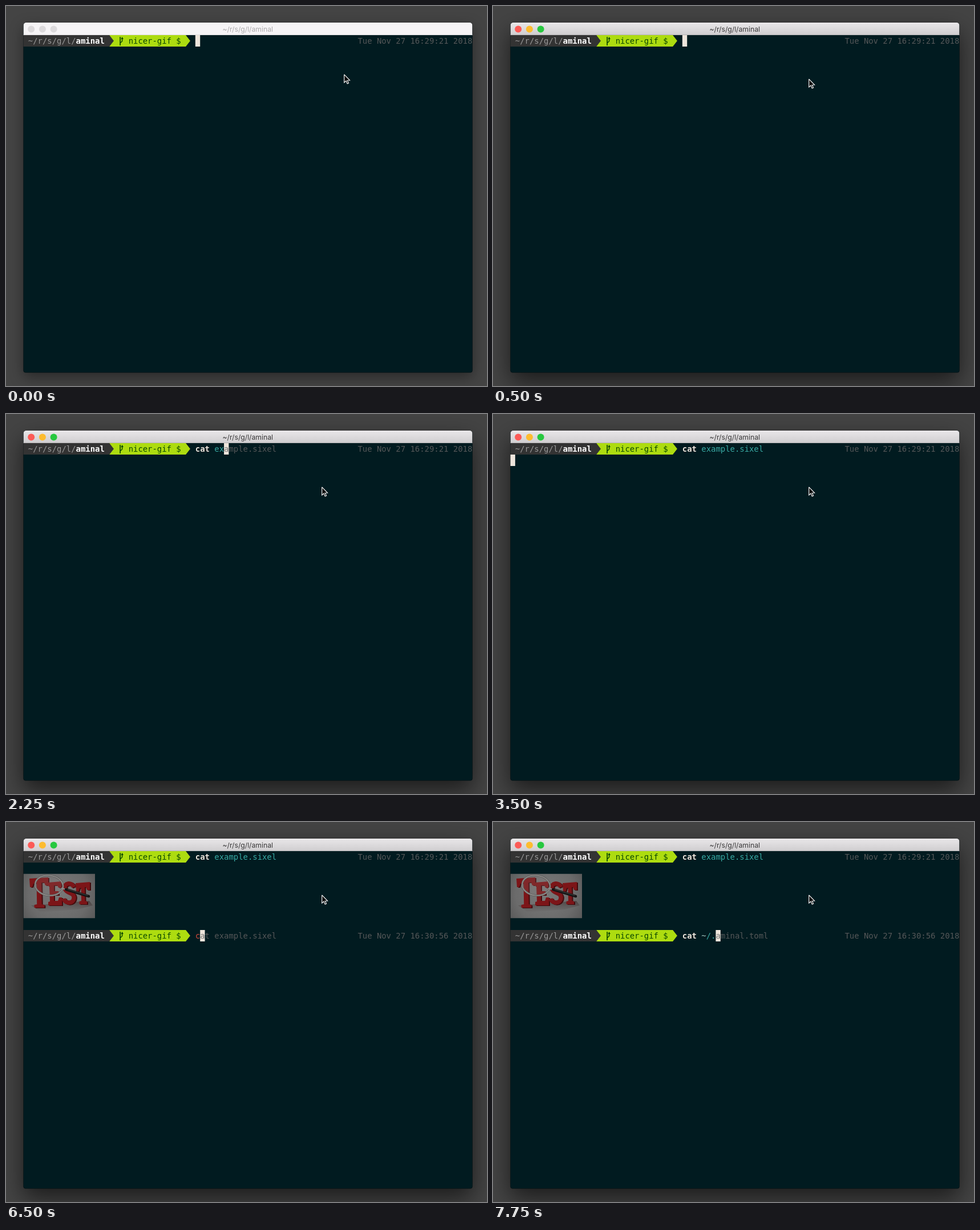
Recreate the animation shown at these times as an HTML page with a canvas. Size 843 by 665 pixels, loop 8 s.

```html
<!DOCTYPE html>
<html lang="en">
<head>
<meta charset="utf-8">
<title>Terminal</title>
<style>
html, body { margin: 0; width: 100%; height: 100%; overflow: hidden; background: #444; }
canvas { display: block; }
</style>
</head>
<body>
<canvas id="stage" width="843" height="665"></canvas>
<script>
const ctx = document.getElementById('stage').getContext('2d');
const LOOP = 8000;
const CELL = 8.37, LINE = 19.67;
const WIN = { x: 30.5, y: 29, w: 787, h: 612.5, bar: 22 };
const INPUT_COL = 36;
const MONO = '13.9px "DejaVu Sans Mono", monospace';
const PALE = '#eee5dc', CYAN = '#38aaa4', DIM = '#555758', GREEN = '#addc10', INK = '#0c4801';
const SIXEL = 'cat example.sixel', TOML = 'cat ~/.aminal.toml';

// Each step holds until the next: start time, typed text, suggested command.
const firstInput = [
  [0, '', ''],
  [1500, 'c', TOML],
  [1750, 'cat ', TOML],
  [2250, 'cat ex', SIXEL],
  [2750, SIXEL + ' ', '']
];
const secondInput = [
  [4000, '', ''],
  [6500, 'c', SIXEL],
  [6750, 'cat', SIXEL],
  [7000, 'cat ', SIXEL],
  [7250, 'cat ~', TOML],
  [7500, 'cat ~/', TOML],
  [7750, 'cat ~/.', TOML]
];

const stepAt = (steps, t) => steps.filter(s => s[0] <= t).pop();
const colX = col => WIN.x + col * CELL;
const rowY = row => 51 + row * LINE;

function polygon(points, fill) {
  ctx.beginPath();
  points.forEach(([x, y]) => ctx.lineTo(x, y));
  ctx.closePath();
  ctx.fillStyle = fill;
  ctx.fill();
}

function line(points, color, width) {
  ctx.beginPath();
  points.forEach(([x, y]) => ctx.lineTo(x, y));
  ctx.strokeStyle = color;
  ctx.lineWidth = width;
  ctx.stroke();
}

function disc(x, y, r, fill) {
  ctx.beginPath();
  ctx.arc(x, y, r, 0, Math.PI * 2);
  ctx.fillStyle = fill;
  ctx.fill();
}

// Text sits on the terminal grid, one glyph per cell.
function write(text, col, row, color, bold) {
  ctx.font = (bold ? 'bold ' : '') + MONO;
  ctx.textAlign = 'left';
  ctx.fillStyle = color;
  const y = Math.round(rowY(row) + 15);
  [...text].forEach((ch, i) => ctx.fillText(ch, colX(col + i), y));
}

function cells(col, count, row, color) {
  const y = Math.round(rowY(row));
  ctx.fillStyle = color;
  ctx.fillRect(colX(col), y, count * CELL, 20);
}

function arrow(col, row, color) {
  const x = colX(col), y = Math.round(rowY(row));
  polygon([[x - 0.5, y], [x, y], [x + 7.8, y + 10], [x, y + 20], [x - 0.5, y + 20]], color);
}

function branchIcon(col, row) {
  const x = colX(col), y = Math.round(rowY(row));
  line([[x + 2.2, y + 3], [x + 2.2, y + 18]], INK, 1.7);
  line([[x + 2.2, y + 14], [x + 5.7, y + 10.5], [x + 5.7, y + 5]], INK, 1.5);
  polygon([[x + 3.4, y + 7], [x + 5.7, y + 3], [x + 8, y + 7]], INK);
}

function prompt(row, date) {
  cells(0, 18, row, '#333');
  cells(18, 16, row, GREEN);
  arrow(18, row, '#333');
  arrow(34, row, GREEN);
  write('~/r/s/g/l/', 1, row, '#999');
  write('aminal', 11, row, '#fff', true);
  branchIcon(20, row);
  write('nicer-gif $', 22, row, INK);
  write(date, 70, row, DIM);
}

function commandLine(row, [, typed, suggestion], showCursor) {
  const end = INPUT_COL + typed.length;
  if (typed.startsWith('cat')) {
    write('cat', INPUT_COL, row, PALE, true);
    [...typed.slice(3)].forEach((ch, i) =>
      write(ch, INPUT_COL + 3 + i, row, ch === '~' ? '#a9cbc5' : CYAN));
  } else {
    write(typed, INPUT_COL, row, '#d04a3c');
  }
  const rest = suggestion.slice(typed.length);
  write(rest, end, row, DIM);
  if (showCursor) {
    cells(end, 1, row, PALE);
    write(rest.slice(0, 1), end, row, '#777');
  }
}

function windowShape() {
  ctx.beginPath();
  ctx.roundRect(WIN.x, WIN.y, WIN.w, WIN.h, [5, 5, 4, 4]);
}

function windowFrame(focused) {
  ctx.save();
  ctx.shadowColor = focused ? 'rgba(0,0,0,.6)' : 'rgba(0,0,0,.4)';
  ctx.shadowBlur = focused ? 42 : 24;
  ctx.shadowOffsetY = focused ? 16 : 8;
  windowShape();
  ctx.fillStyle = '#011b20';
  ctx.fill();
  ctx.restore();
  ctx.strokeStyle = 'rgba(0,0,0,.3)';
  ctx.lineWidth = 1;
  ctx.stroke();

  ctx.save();
  windowShape();
  ctx.clip();
  const bar = ctx.createLinearGradient(0, WIN.y, 0, WIN.y + WIN.bar);
  bar.addColorStop(0, focused ? '#e9e7e9' : '#f6f4f6');
  bar.addColorStop(1, focused ? '#cfcdcf' : '#f6f4f6');
  ctx.fillStyle = bar;
  ctx.fillRect(WIN.x, WIN.y, WIN.w, WIN.bar);
  ctx.fillStyle = focused ? '#b5b3b5' : '#dddbdd';
  ctx.fillRect(WIN.x, WIN.y + WIN.bar - 1, WIN.w, 1);
  ctx.restore();

  const lights = focused ? ['#fc5b57', '#fdbc2f', '#27c83f'] : Array(3).fill('#dcdadc');
  lights.forEach((color, i) => disc(44.2 + i * 19.7, 40.5, 6, color));
  ctx.font = '12.2px Inter, sans-serif';
  ctx.textAlign = 'center';
  ctx.fillStyle = focused ? '#3a393a' : '#adabad';
  ctx.fillText('~/r/s/g/l/aminal', 423.7, 45);
}

function letters(color) {
  const tee = (x, y, w, h) => polygon([
    [x, y + 2], [x + w, y], [x + w, y + 14], [x + w - 5, y + 14], [x + w - 7, y + 9],
    [x + w * 0.64, y + 9], [x + w * 0.66, y + h - 6], [x + w * 0.8, y + h - 5],
    [x + w * 0.8, y + h], [x + w * 0.26, y + h], [x + w * 0.26, y + h - 5],
    [x + w * 0.4, y + h - 6], [x + w * 0.38, y + 10], [x + 7, y + 11],
    [x + 5, y + 17], [x + 1, y + 17]
  ], color);
  tee(41, 97, 33, 53);
  tee(122, 105, 25, 39);
  polygon([
    [73, 106], [97, 104], [97, 115], [92, 115], [90, 111], [84, 111], [84, 121], [92, 121],
    [92, 128], [84, 128], [84, 138], [91, 138], [93, 132], [98, 132], [98, 146], [74, 146],
    [74, 140], [77, 139], [76, 112], [73, 112]
  ], color);
  ctx.beginPath();
  ctx.moveTo(119, 114);
  ctx.bezierCurveTo(115, 104, 101, 107, 103, 116);
  ctx.bezierCurveTo(105, 126, 120, 122, 119, 133);
  ctx.bezierCurveTo(118, 144, 103, 143, 101, 134);
  ctx.strokeStyle = color;
  ctx.lineWidth = 7.5;
  ctx.stroke();
}

function testPicture() {
  const x = WIN.x, y = 90.5, w = 125.5, h = 78;
  ctx.save();
  ctx.beginPath();
  ctx.rect(x, y, w, h);
  ctx.clip();
  const tone = ctx.createRadialGradient(92, 122, 8, 92, 128, 82);
  tone.addColorStop(0, '#777');
  tone.addColorStop(0.6, '#6b6b6b');
  tone.addColorStop(1, '#545454');
  ctx.fillStyle = tone;
  ctx.fillRect(x, y, w, h);

  const shade = ctx.createLinearGradient(0, 138, 0, 158);
  shade.addColorStop(0, 'rgba(50,35,35,.55)');
  shade.addColorStop(1, 'rgba(70,60,60,0)');
  polygon([[44, 146], [146, 138], [152, 146], [126, 153], [62, 158]], shade);

  ctx.save();
  ctx.translate(2, 1);
  letters('#430b0d');
  ctx.restore();
  letters('#7c1518');

  ctx.beginPath();
  ctx.ellipse(75.5, 111, 24.5, 17.5, 0.12, 0, Math.PI * 2);
  ctx.fillStyle = 'rgba(150,140,138,.16)';
  ctx.fill();
  ctx.strokeStyle = '#555';
  ctx.lineWidth = 3.2;
  ctx.stroke();
  ctx.strokeStyle = '#8d8b88';
  ctx.lineWidth = 1.8;
  ctx.stroke();
  ctx.lineCap = 'round';
  line([[98, 116], [105, 118]], '#8a8886', 2.5);
  line([[105, 118], [145, 130]], '#151515', 4.5);
  line([[108, 118], [143, 128.5]], '#4a4a4a', 0.9);
  ctx.restore();
}

function pointer(x, y) {
  const shape = [[0.7, 0.8], [0.7, 15], [4, 12], [6.2, 17], [8.5, 16], [6.3, 11.2], [10.5, 11]];
  const points = shape.map(([dx, dy]) => [x + dx, y + dy]);
  polygon(points, '#080808');
  line([...points, points[0]], '#f4f4f4', 1.2);
}

function draw(t) {
  ctx.fillStyle = '#444';
  ctx.fillRect(0, 0, 843, 665);
  windowFrame(t >= 500);

  prompt(0, 'Tue Nov 27 16:29:21 2018');
  commandLine(0, stepAt(firstInput, t), t < 3500);
  if (t >= 4000) {
    testPicture();
    prompt(7, 'Tue Nov 27 16:30:56 2018');
    commandLine(7, stepAt(secondInput, t), true);
  } else if (t >= 3500) {
    cells(0, 1, 1, PALE);
  }

  if (t < 250) pointer(592, 119);
  else pointer(553, 127);
}

function tick() {
  draw(performance.now() % LOOP);
  requestAnimationFrame(tick);
}
tick();
</script>
</body>
</html>
```
